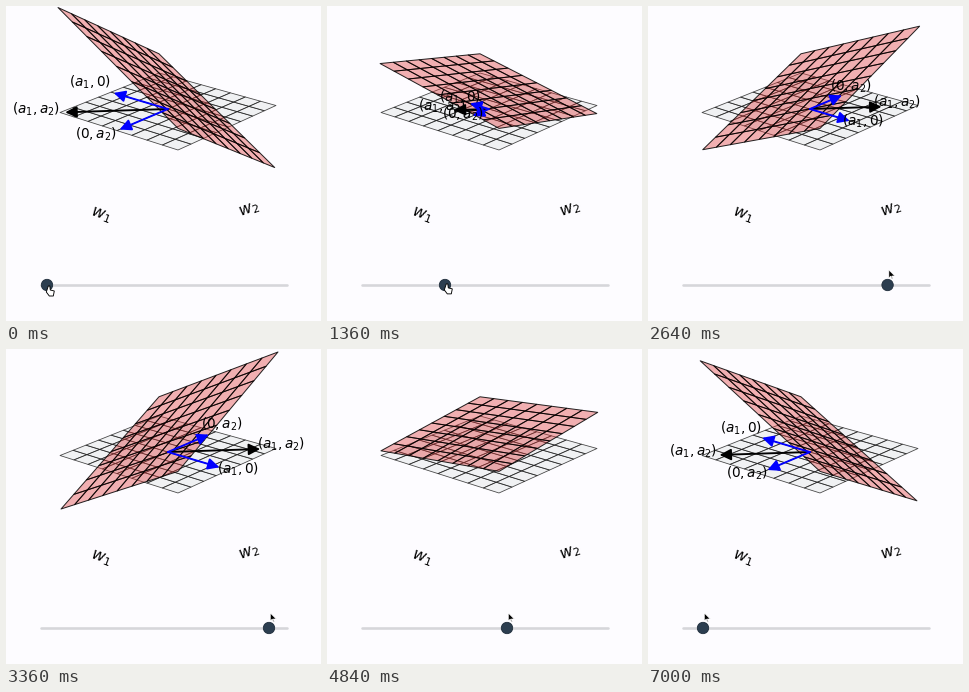
Write a matplotlib script that moves like this. It is 315 px wide and 315 px high and loops after 7.04 s.

```python
import numpy as np
import matplotlib.pyplot as plt
from matplotlib.animation import FuncAnimation
from matplotlib.collections import PolyCollection
from matplotlib.patches import Circle, FancyArrowPatch, Polygon

SIZE, DPI = 315, 100
STEP, FRAMES = 40, 176
PT = 72 / DPI  # points per pixel
CELLS = 8
X0, X1, TRACK_Y = 35, 281, 279
BG = "#fdfcff"

# Screen corners of the ground square: left, right, back, front
CORNERS = np.array([(54, 106.5), (270, 99.5), (153, 67), (172, 144)])
RISE = np.array([-1.26, -44.4, -0.008])  # effect of one unit of height
LIFT = 0.465  # height of the moving plane at its centre

# Key moments of the drag: time (ms), knob x
DRAG = [(0, 41), (1360, 118), (2160, 214), (3080, 263),
        (3600, 263), (4840, 180), (7000, 55)]


def camera():
    """Homogeneous x axis, y axis and centre of the ground square."""
    lines = np.vstack([CORNERS.T * [1, 1, -1, -1], [1, 1, -1, -1], [1] * 4])
    w = np.linalg.solve(lines, [0, 0, 0, 4])
    left, right, back, front = np.column_stack([CORNERS, np.ones(4)]) * w[:, None]
    return ((right + front - left - back) / 4,
            (right + back - left - front) / 4,
            (left + right) / 2)


AXIS_X, AXIS_Y, CENTRE = camera()


def project(x, y, z=0):
    x, y, z = (np.asarray(v)[..., None] for v in (x, y, z))
    p = CENTRE + x * AXIS_X + y * AXIS_Y + z * RISE
    return p[..., :2] / p[..., 2:]


def quads(slope, lift):
    g = np.linspace(-1, 1, CELLS + 1)
    x, y = np.meshgrid(g, g)
    p = project(x, y, slope * (x + y) + lift)
    cells = np.stack([p[:-1, :-1], p[:-1, 1:], p[1:, 1:], p[1:, :-1]], axis=2)
    return cells.reshape(-1, 4, 2)


def smooth(u):
    u = np.clip(u, 0, 1)
    return u * u * (3 - 2 * u)


fig = plt.figure(figsize=(SIZE / DPI, SIZE / DPI), dpi=DPI, facecolor=BG)
ax = fig.add_axes([0, 0, 1, 1])
ax.set(xlim=(0, SIZE), ylim=(SIZE, 0))
ax.axis("off")


def add_plane(verts, face, edge, width, z):
    mesh = PolyCollection(verts, facecolors=face, edgecolors=edge,
                          linewidths=width * PT, zorder=z)
    ax.add_collection(mesh)
    return mesh


def add_label(pos, text, size=10, angle=0):
    return ax.text(*pos, text, size=size, rotation=angle,
                   ha="center", va="center", zorder=8)


def add_vector(color, label, z):
    arrow = FancyArrowPatch((0, 0), (1, 1), arrowstyle="-|>", color=color,
                            mutation_scale=17, lw=1.9 * PT,
                            shrinkA=0, shrinkB=0, zorder=z)
    ax.add_patch(arrow)
    return arrow, add_label((0, 0), label, 9.8)


add_plane(quads(0, 0), (0.85, 0.87, 0.87, 0.35), (0.1, 0.1, 0.1, 0.8), 0.8, 1)
plane = add_plane(quads(0, LIFT), (0.87, 0.2, 0.2, 0.38), (0, 0, 0, 0.85), 1, 2)

add_label((95, 209.5), "$w_1$", 11.5, -20)
add_label((243, 204.5), "$w_2$", 11.5, 20)

# direction, label distance, artists
vectors = [
    ((1, 1), 1.26, add_vector("black", "$(a_1, a_2)$", 4)),
    ((1, 0), 1.4, add_vector("blue", "$(a_1, 0)$", 5)),
    ((0, 1), 1.4, add_vector("blue", "$(0, a_2)$", 5)),
]

ax.plot([X0, X1], [TRACK_Y] * 2, color="#d6d6da", lw=2.6 * PT,
        solid_capstyle="round", zorder=9)
knob = ax.add_patch(Circle((X0, TRACK_Y), 5.7, fc="#2c3e50", ec="#1c2a38",
                           lw=0.8 * PT, zorder=10))

ARROW = np.array([(0, 0), (0, 8), (2, 6), (3, 9), (4, 9), (3, 6), (6, 6)])
HAND = np.array([(0, 0), (1.5, 0), (2, 4), (6, 5), (5, 10), (1, 10), (-2, 6)])
arrow_cursor = ax.add_patch(Polygon(ARROW, fc="black", ec="white",
                                    lw=0.6 * PT, zorder=11))
hand_cursor = ax.add_patch(Polygon(HAND, fc="white", ec="black",
                                   lw=0.9 * PT, zorder=11))


def update(i):
    t = i * STEP
    s = np.interp(t, *zip(*DRAG))
    a = 2 * (s - X0) / (X1 - X0) - 1

    plane.set_verts(quads(a, LIFT))
    for (dx, dy), reach, (arrow, text) in vectors:
        arrow.set_positions(project(0, 0), project(a * dx, a * dy))
        text.set_position(project(reach * a * dx, reach * a * dy) - (3, 4))
        for artist in (arrow, text):
            artist.set_visible(abs(a) > 0.25)

    # The pointer slips off the knob during the first drag
    slip = smooth((t - 1200) / 700)
    tip = np.array([s + 1.3, 280 - 16 * slip])
    knob.center = (s, TRACK_Y)
    hand_cursor.set_xy(HAND + tip)
    arrow_cursor.set_xy(ARROW + tip)
    hand_cursor.set_visible(slip < 0.45)
    arrow_cursor.set_visible(slip >= 0.45)
    return []


anim = FuncAnimation(fig, update, frames=FRAMES, interval=STEP, repeat=True,
                     repeat_delay=0, init_func=lambda: [])
plt.show()
```
